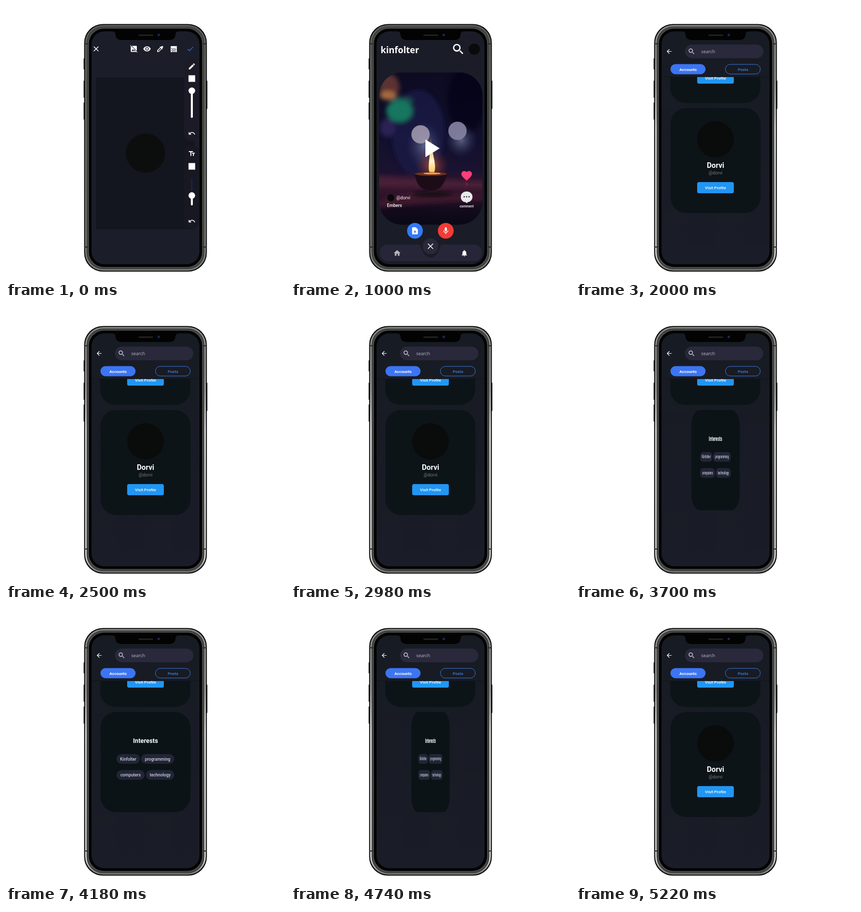
Write an HTML page that moves like this. It is 548x540 px and loops after 5.3 s.

```html
<!DOCTYPE html>
<html lang="en">
<head>
<meta charset="utf-8">
<title>Phone app preview</title>
<style>
  html, body { margin: 0; width: 100%; height: 100%; overflow: hidden; background: #fff; }
  svg { display: block; width: 548px; height: 540px; font-family: Roboto, Arial, sans-serif; }
  .w { fill: #fff; }
  .mid { text-anchor: middle; }
  .btn { font-size: 8px; font-weight: 500; fill: #fff; text-anchor: middle; }
  .chip rect { fill: #222536; }
  .chip text { font-size: 8.3px; font-weight: 500; fill: #cfd0d8; text-anchor: middle; }
</style>
</head>
<body>
<svg viewBox="0 0 548 540" xmlns="http://www.w3.org/2000/svg">
  <defs>
    <linearGradient id="metal" x2="0" y2="1">
      <stop offset="0" stop-color="#5c5e5c"/><stop offset=".5" stop-color="#70726f"/><stop offset="1" stop-color="#7d7f7b"/>
    </linearGradient>
    <linearGradient id="shine" x2="0" y2="1">
      <stop offset="0" stop-color="#8a8a8a"/><stop offset=".25" stop-color="#a4a4a4"/>
      <stop offset=".42" stop-color="#ececec"/><stop offset=".94" stop-color="#dcdcdc"/><stop offset="1" stop-color="#777"/>
    </linearGradient>
    <linearGradient id="searchBg" x2="0" y2="1">
      <stop offset="0" stop-color="#171b23"/><stop offset="1" stop-color="#1a1c27"/>
    </linearGradient>
    <linearGradient id="night" x2="0" y2="1">
      <stop offset="0" stop-color="#0d0b22"/><stop offset=".45" stop-color="#11102e"/>
      <stop offset=".65" stop-color="#1b1230"/><stop offset=".74" stop-color="#38182f"/>
      <stop offset=".83" stop-color="#2b1329"/><stop offset=".9" stop-color="#120b1c"/><stop offset="1" stop-color="#0a0815"/>
    </linearGradient>
    <linearGradient id="flame" x2="0" y2="1">
      <stop offset="0" stop-color="#ff9a3a" stop-opacity=".4"/><stop offset=".35" stop-color="#ffc568"/>
      <stop offset=".65" stop-color="#fff6d0"/><stop offset="1" stop-color="#ffc04a"/>
    </linearGradient>
    <radialGradient id="glow">
      <stop offset="0" stop-color="#d9622f" stop-opacity=".7"/><stop offset="1" stop-color="#702638" stop-opacity="0"/>
    </radialGradient>
    <radialGradient id="haze">
      <stop offset="0" stop-color="#7f83a8" stop-opacity=".7"/><stop offset="1" stop-color="#39426d" stop-opacity="0"/>
    </radialGradient>
    <filter id="soft" x="-50%" y="-50%" width="200%" height="200%"><feGaussianBlur stdDeviation="4"/></filter>
    <clipPath id="display"><rect x="168" y="50" width="212" height="459" rx="25"/></clipPath>
    <clipPath id="photo"><rect x="173" y="131" width="203" height="300" rx="45"/></clipPath>
    <clipPath id="list"><rect x="168" y="139" width="212" height="370"/></clipPath>

    <path id="close" d="M19 6.4 17.6 5 12 10.6 6.4 5 5 6.4l5.6 5.6L5 17.6 6.4 19l5.6-5.6 5.6 5.6 1.4-1.4-5.6-5.6z"/>
    <path id="eye" fill-rule="evenodd" d="M12 4.5C7 4.5 2.7 7.6 1 12c1.7 4.4 6 7.5 11 7.5s9.3-3.1 11-7.5c-1.7-4.4-6-7.5-11-7.5zM12 17a5 5 0 1 1 0-10 5 5 0 0 1 0 10zm0-8a3 3 0 1 0 0 6 3 3 0 0 0 0-6z"/>
    <path id="pencil" d="M3 17.25V21h3.75L17.8 9.95 14.05 6.2zM20.7 7.04c.4-.4.4-1 0-1.4l-2.35-2.35c-.4-.4-1-.4-1.4 0l-1.83 1.83 3.75 3.75z"/>
    <path id="dropper" fill-rule="evenodd" d="M20.7 5.6 18.4 3.3c-.4-.4-1-.4-1.4 0l-3.1 3.1-2-1.9-1.4 1.4 1.4 1.4L3 16.2V21h4.8l8.9-8.9 1.4 1.4 1.4-1.4-1.9-1.9 3.1-3.1c.4-.5.4-1.1 0-1.5zM6.9 19 5 17.1 13.1 9l1.9 1.9z"/>
    <path id="check" d="M9 16.2 4.8 12l-1.4 1.4L9 19 21 7l-1.4-1.4z"/>
    <path id="undo" d="M12.5 8c-2.65 0-5.05 1-6.9 2.6L2 7v9h9l-3.6-3.6c1.4-1.2 3.1-1.9 5.1-1.9 3.5 0 6.5 2.3 7.6 5.5l2.4-.8C21 11 17.1 8 12.5 8z"/>
    <path id="type" d="M2.5 4v3h5v12h3V7h5V4zm19 5h-9v3h3v7h3v-7h3z"/>
    <path id="noImage" fill-rule="evenodd" d="M2 1 1 2l2 2v15c0 1.1.9 2 2 2h15l2 2 1-1zM5 18l4-5 2.5 3 1.5-2 4 4zM6 3h13c1.1 0 2 .9 2 2v13z"/>
    <path id="search" fill="none" stroke-width="2.3" d="M14.8 14.8 20 20M9.5 4a5.6 5.6 0 1 1 0 11.2 5.6 5.6 0 0 1 0-11.2z"/>
    <path id="heart" d="M12 21.3 10.5 20C5.4 15.4 2 12.3 2 8.5 2 5.4 4.4 3 7.5 3c1.7 0 3.4.8 4.5 2.1C13.1 3.8 14.8 3 16.5 3 19.6 3 22 5.4 22 8.5c0 3.8-3.4 6.9-8.5 11.5z"/>
    <path id="home" d="M10 20v-6h4v6h5v-8h3L12 3 2 12h3v8z"/>
    <path id="bell" d="M12 22a2 2 0 0 0 2-2h-4c0 1.1.9 2 2 2zm6-6v-5c0-3.1-1.6-5.6-4.5-6.3V4a1.5 1.5 0 0 0-3 0v.7C7.6 5.4 6 7.9 6 11v5l-2 2v1h16v-1z"/>
    <path id="mic" d="M12 14a3 3 0 0 0 3-3V5a3 3 0 0 0-6 0v6a3 3 0 0 0 3 3zm5.3-3c0 3-2.5 5.1-5.3 5.1S6.7 14 6.7 11H5c0 3.4 2.7 6.2 6 6.7V21h2v-3.3c3.3-.5 6-3.3 6-6.7z"/>
    <path id="upload" fill-rule="evenodd" d="M14 2H6a2 2 0 0 0-2 2v16c0 1.1.9 2 2 2h12a2 2 0 0 0 2-2V8zM11 19v-4H8l4-4 4 4h-3v4z"/>
    <path id="back" d="M20 11H7.8l5.6-5.6L12 4l-8 8 8 8 1.4-1.4L7.8 13H20z"/>
  </defs>

  <rect width="548" height="540" fill="#fff"/>
  <g fill="#151615">
    <rect x="152.5" y="103" width="3" height="22" rx="1"/>
    <rect x="152.5" y="147" width="3" height="34" rx="1"/>
    <rect x="152.5" y="190" width="3" height="34" rx="1"/>
    <rect x="392.5" y="147" width="3" height="56" rx="1"/>
  </g>
  <rect x="153.5" y="35.5" width="241" height="488" rx="37" fill="#050505"/>
  <rect x="158.5" y="40.5" width="231" height="478" rx="33" fill="none" stroke="#3f413f" stroke-width="7"/>
  <rect id="rim" x="157" y="39" width="234" height="481" rx="34" fill="none" stroke="url(#metal)" stroke-width="2.5"/>
  <rect x="162" y="44" width="224" height="471" rx="30" fill="#030303" stroke="#5a5c5a" stroke-width="1.2"/>
  <path d="M154 74.5h7m226 0h7M154 475h7m226 0h7" stroke="#222422" stroke-width="2"/>

  <g clip-path="url(#display)">
    <g id="editor">
      <rect x="168" y="50" width="212" height="459" fill="#1b1d29"/>
      <rect x="177" y="141" width="194" height="299" fill="#13151f"/>
      <rect x="350" y="102" width="30" height="164" rx="14" fill="#1d1a27"/>
      <rect x="350" y="275" width="30" height="164" rx="14" fill="#181822"/>
      <circle cx="274" cy="290" r="38.5" fill="#0b0e0d"/>
      <g id="editorIcons" class="w"></g>
      <g class="w">
        <path d="M323.5 79h12v12h-12z"/>
        <path d="M325 84h9m-9 4h9" stroke="#1b1d29" stroke-width="1.5" stroke-dasharray="1.5"/>
        <path d="M326.5 86h9m-9 4h7" stroke="#1b1d29" stroke-width="1.3" stroke-dasharray="1.5"/>
        <path d="M358.5 136.5h13v13h-13zM358.5 309.5h13v13h-13z"/>
        <rect x="363" y="164" width="4" height="56.5" rx="2"/>
        <circle cx="365" cy="167" r="6.5"/>
        <rect x="363.5" y="340" width="3" height="30" rx="1.5" fill="#19243f"/>
        <rect x="363" y="372" width="4" height="21" rx="2"/>
        <circle cx="365" cy="373.5" r="6.5"/>
      </g>
    </g>

    <g id="feed">
      <rect x="168" y="50" width="212" height="459" fill="#1a1c27"/>
      <text x="176" y="92.5" class="w" font-family="Noto Sans, sans-serif" font-weight="700" font-size="17.3">kinfolter</text>
      <circle cx="360" cy="85" r="11" fill="#080b0a"/>
      <g clip-path="url(#photo)">
        <rect x="173" y="131" width="203" height="300" fill="url(#night)"/>
        <g filter="url(#soft)">
          <ellipse cx="250" cy="250" rx="52" ry="85" fill="#1d1b48" opacity=".75"/>
          <ellipse cx="345" cy="185" rx="38" ry="65" fill="#080818" opacity=".6"/>
          <ellipse cx="193" cy="160" rx="20" ry="26" fill="#5c3330"/>
          <ellipse cx="190" cy="176" rx="16" ry="9" fill="#a56a3c"/>
          <ellipse cx="218" cy="187" rx="22" ry="9" fill="#1d4a4c"/>
          <ellipse cx="213" cy="207" rx="26" ry="22" fill="#15765f"/>
          <ellipse cx="190" cy="240" rx="15" ry="18" fill="#292052"/>
          <path d="M166 334q110 8 218 12v14q-110-4-218-4z" fill="#54223a" opacity=".65"/>
          <path d="M166 385q60-22 120-16t98 2v10q-110 6-218 18z" fill="#461c30" opacity=".7"/>
          <ellipse cx="278" cy="371" rx="40" ry="6" fill="#160a18"/>
        </g>
        <ellipse cx="262" cy="275" rx="36" ry="48" fill="url(#haze)"/>
        <ellipse cx="334" cy="264" rx="32" ry="34" fill="url(#haze)"/>
        <circle cx="254.5" cy="253" r="18" fill="#a39bb0" opacity=".88"/>
        <circle cx="327" cy="246" r="18" fill="#8582a2" opacity=".92"/>
        <circle cx="277" cy="314" r="34" fill="url(#glow)"/>
        <path d="M274.5 258c1 26 8.5 44 8.500 60q0 12-6 13-7-1-6.500-14c.5-16 4-32 4-59z" fill="url(#flame)"/>
        <path d="M243 331q5 33 31 33t32-33z" fill="#1d0c18"/>
        <ellipse cx="274.5" cy="331" rx="31.500" ry="3.500" fill="#71331f"/>
        <ellipse cx="277" cy="330" rx="17" ry="1.800" fill="#f7a745"/>
      </g>
      <path d="M264 263v35l28-17.500z" class="w"/>
      <circle cx="196" cy="378" r="7" fill="#080b0a"/>
      <text x="207" y="381" class="w" font-size="8.700">@dorvi</text>
      <text x="188.500" y="396" class="w" font-size="8.700" font-weight="500">Embers</text>
      <text x="345" y="354" class="mid" font-size="7" fill="#ff3d78">1</text>
      <path d="M345 365.500c6.500 0 11.500 4.500 11.500 10.500s-5 10.500-9 10.500l-2.500 2-2.500-2c-5 0-9-4.500-9-10.500s5-10.500 11.500-10.500z" fill="#e8e8ea"/>
      <path d="M340.200 376h9.700" stroke="#222" stroke-width="2.600" stroke-linecap="round" stroke-dasharray="0 4.800"/>
      <text x="345" y="397" class="w mid" font-size="6.500" font-weight="500">comment</text>
      <circle cx="243.500" cy="443" r="15.500" fill="#337af5"/>
      <circle cx="304" cy="443" r="15.500" fill="#f33b35"/>
      <path d="M190.500 470H249c6 0 6 5 8 10q6 16 17 16t17-16c2-5 2-10 8-10h60a16.500 16.500 0 0 1 0 33H190.500a16.500 16.500 0 0 1 0-33z" fill="#262638"/>
      <circle cx="274" cy="473.500" r="15.500" fill="#29293b"/>
      <g id="feedIcons" class="w"></g>
    </g>

    <g id="accounts">
      <rect x="168" y="50" width="212" height="459" fill="url(#searchBg)"/>
      <g clip-path="url(#list)">
        <rect x="185" y="90" width="177" height="101" rx="30" fill="#0d1418"/>
        <rect x="238" y="131" width="72" height="22" rx="3.500" fill="#2196f3"/>
        <text x="274" y="145" class="btn">Visit Profile</text>
        <g id="card">
          <g id="front">
            <rect x="185.500" y="201" width="177" height="207" rx="31" fill="#0d1418"/>
            <circle cx="274" cy="263" r="36" fill="#0a0b0b"/>
            <text x="274" y="318.500" class="w mid" font-size="14.500" font-weight="700">Dorvi</text>
            <text x="274" y="332" class="mid" font-size="8.700" fill="#777b7d">@dorvi</text>
            <rect x="238" y="347" width="72" height="22" rx="3.500" fill="#2196f3"/>
            <text x="274" y="361" class="btn">Visit Profile</text>
          </g>
          <g id="rear">
            <rect x="185.500" y="201" width="177" height="197.500" rx="31" fill="#0b1316"/>
            <text x="274" y="262" class="w mid" font-size="12.300" font-weight="700">Interests</text>
            <g id="chips" class="chip"></g>
          </g>
        </g>
      </g>
      <path d="M168 139.500h212" stroke="#10141a"/>
      <rect x="214" y="76" width="154" height="27" rx="13.500" fill="#29293b"/>
      <text x="246" y="93" font-family="Open Sans, sans-serif" font-size="8.800" fill="#b9bac6">search</text>
      <rect x="185.500" y="114.500" width="69" height="20" rx="10" fill="#3c75f3"/>
      <text x="220" y="127.500" class="btn" style="font-weight:700">Accounts</text>
      <rect x="293.500" y="115" width="68.500" height="19" rx="9.500" fill="none" stroke="#3a76dc"/>
      <text x="328" y="127.500" class="btn" style="fill:#3f82ea">Posts</text>
      <g id="accountIcons" class="w"></g>
    </g>

    <path d="M209 50q6 0 6 6 1 11 12 11h94q11 0 12-11 0-6 6-6z" fill="#030303"/>
  </g>
  <rect x="260" y="56" width="29" height="3" rx="1.500" fill="#202124"/>
  <circle cx="300" cy="57" r="3" fill="#0c1630"/>
  <circle cx="300" cy="57" r="1.200" fill="#244782"/>
</svg>

<script>
const NS = "http://www.w3.org/2000/svg";
const $ = id => document.getElementById(id);

function add(parent, tag, attrs, text = "") {
  const node = document.createElementNS(NS, tag);
  for (const key in attrs) node.setAttribute(key, attrs[key]);
  node.textContent = text;
  return parent.appendChild(node);
}

// Places a 24-unit icon by its centre.
function icon(group, name, x, y, size, fill = "#fff") {
  add($(group), "use", {
    href: "#" + name, fill, stroke: name === "search" ? fill : "none",
    transform: `translate(${x - size / 2} ${y - size / 2}) scale(${size / 24})`
  });
}

icon("editorIcons", "close", 177, 84.5, 17);
icon("editorIcons", "noImage", 251, 84.5, 16);
icon("editorIcons", "eye", 277, 84.5, 16);
icon("editorIcons", "dropper", 303, 84.5, 16);
icon("editorIcons", "check", 362, 84.5, 16, "#286ce0");
icon("editorIcons", "pencil", 365, 119, 16);
icon("editorIcons", "undo", 365, 251, 15);
icon("editorIcons", "type", 365, 291, 15);
icon("editorIcons", "undo", 365, 424, 15);

icon("feedIcons", "search", 328.5, 85, 27);
icon("feedIcons", "heart", 345, 334.5, 25, "#ff3d78");
icon("feedIcons", "upload", 243.5, 443, 17);
icon("feedIcons", "mic", 304, 443, 17);
icon("feedIcons", "close", 274, 473.5, 19);
icon("feedIcons", "home", 208.5, 487, 16, "#b5b5bd");
icon("feedIcons", "bell", 340.5, 487, 15);

icon("accountIcons", "back", 183, 89.5, 14);
icon("accountIcons", "search", 227, 89.5, 15, "#c5c6d0");

function chip(label, x, y, width) {
  add($("chips"), "rect", { x, y, width, height: 19, rx: 9.5 });
  add($("chips"), "text", { x: x + width / 2, y: y + 12.5 }, label);
}
chip("Kinfolter", 217, 284, 46);
chip("programming", 265, 284, 65.5);
chip("computers", 217, 315.5, 55.5);
chip("technology", 275, 315.5, 55.5);

const LOOP = 5300, FLIP = 500, OPEN = 3360, SHUT = 4560;
const progress = (t, start) => Math.min(1, Math.max(0, (t - start) / FLIP));
const show = (id, on) => $(id).setAttribute("display", on ? "inline" : "none");

function draw(time) {
  let t = time % LOOP;
  if (t >= 2100) t = 2100 + Math.floor((t - 2100) / 80) * 80;
  const searching = t >= 2000;
  show("editor", t < 1000);
  show("feed", t >= 1000 && !searching);
  show("accounts", searching);
  $("rim").setAttribute("stroke", searching ? "url(#shine)" : "url(#metal)");

  const turn = Math.cos(Math.PI * (progress(t, OPEN) - progress(t, SHUT)));
  show("front", turn >= 0);
  show("rear", turn < 0);
  const width = Math.max(0.005, Math.abs(turn));
  $("card").setAttribute("transform", `translate(${274 * (1 - width)} 0) scale(${width} 1)`);
}

const start = performance.now();
function tick() {
  draw(performance.now() - start);
  requestAnimationFrame(tick);
}
tick();
</script>
</body>
</html>
```
